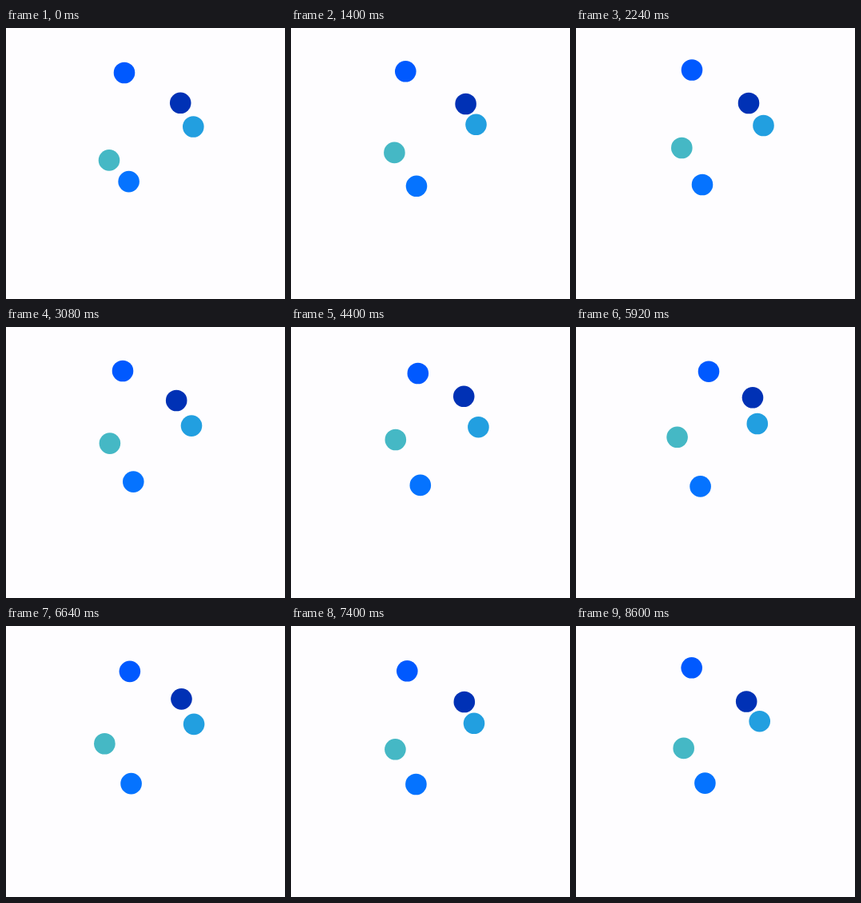
These frames come from a looping animation (349 by 339 pixels, 8640 ms). An HTML page:

```html
<!DOCTYPE html>
<html lang="en">
<head>
<meta charset="utf-8">
<title>Drifting dots</title>
<style>
  html, body { margin: 0; width: 100%; height: 100%; overflow: hidden; background: #fefdff; }
  svg { display: block; }
</style>
</head>
<body>
<svg id="stage" width="349" height="339" viewBox="0 0 349 339"></svg>
<script>
const LOOP = 8640, STEP = 40, WOBBLE = 1.8;
const times = [0, 1400, 2240, 3080, 4400, 5920, 6600, 7400, 8600];

// Each path lists x, y at the times above.
const dots = [
  { color: '#0059ff', path: [148,56, 143.3,54.3, 145,52.5, 146,55, 158.8,58, 166,55.7, 156,56, 145.3,56.3, 144.7,52.3] },
  { color: '#0031b5', path: [218.2,93.8, 218.6,95, 216,94, 213.2,92, 216.2,86.8, 221,88.3, 219,92, 216.8,95, 213.2,94.5] },
  { color: '#229fe0', path: [234.3,123.5, 231.5,120.8, 234.5,122, 232,123.6, 234.4,125.2, 226.8,121, 234.5,122, 229,121.8, 229.7,119.2] },
  { color: '#45b8c5', path: [129,165.4, 129.4,155.9, 132.3,150, 129.9,145.6, 130.8,141, 126.6,137.8, 123.8,146, 130.4,154.3, 134.7,152.9] },
  { color: '#0573ff', path: [153.6,192.1, 157,197.8, 158,196, 159.3,193.6, 161.8,197.9, 155.6,199.4, 156,198, 156.4,198, 161.4,196.6] }
];

const stage = document.getElementById('stage');
for (const dot of dots) {
  dot.node = document.createElementNS('http://www.w3.org/2000/svg', 'circle');
  dot.node.setAttribute('r', 13.3);
  dot.node.setAttribute('fill', dot.color);
  stage.append(dot.node);
}

// Smooth curve through the keys, with a small wobble that rests at each key.
function coordinate(path, axis, t, seed) {
  const last = times.length - 1;
  let i = 0;
  while (i < last - 1 && t >= times[i + 1]) i++;
  const span = times[i + 1] - times[i];
  const u = (t - times[i]) / span;
  const value = k => path[2 * k + axis];
  const slope = k => {
    const a = Math.max(0, k - 1), b = Math.min(last, k + 1);
    return (value(b) - value(a)) / (times[b] - times[a]) * span;
  };
  const u2 = u * u, u3 = u2 * u;
  const base = (2 * u3 - 3 * u2 + 1) * value(i) + (u3 - 2 * u2 + u) * slope(i)
    + (3 * u2 - 2 * u3) * value(i + 1) + (u3 - u2) * slope(i + 1);
  const waves = Math.round(span / 420) + (seed + i) % 2;
  const sign = (seed + i) % 3 ? 1 : -1;
  return base + sign * WOBBLE * Math.sin(Math.PI * waves * u);
}

function draw(now) {
  const t = Math.floor((now % LOOP) / STEP) * STEP;
  dots.forEach((dot, n) => {
    dot.node.setAttribute('cx', coordinate(dot.path, 0, t, 2 * n));
    dot.node.setAttribute('cy', coordinate(dot.path, 1, t, 2 * n + 1));
  });
}

let start;
function frame(now) {
  start ??= now;
  draw(now - start);
  requestAnimationFrame(frame);
}
draw(0);
requestAnimationFrame(frame);
</script>
</body>
</html>
```
